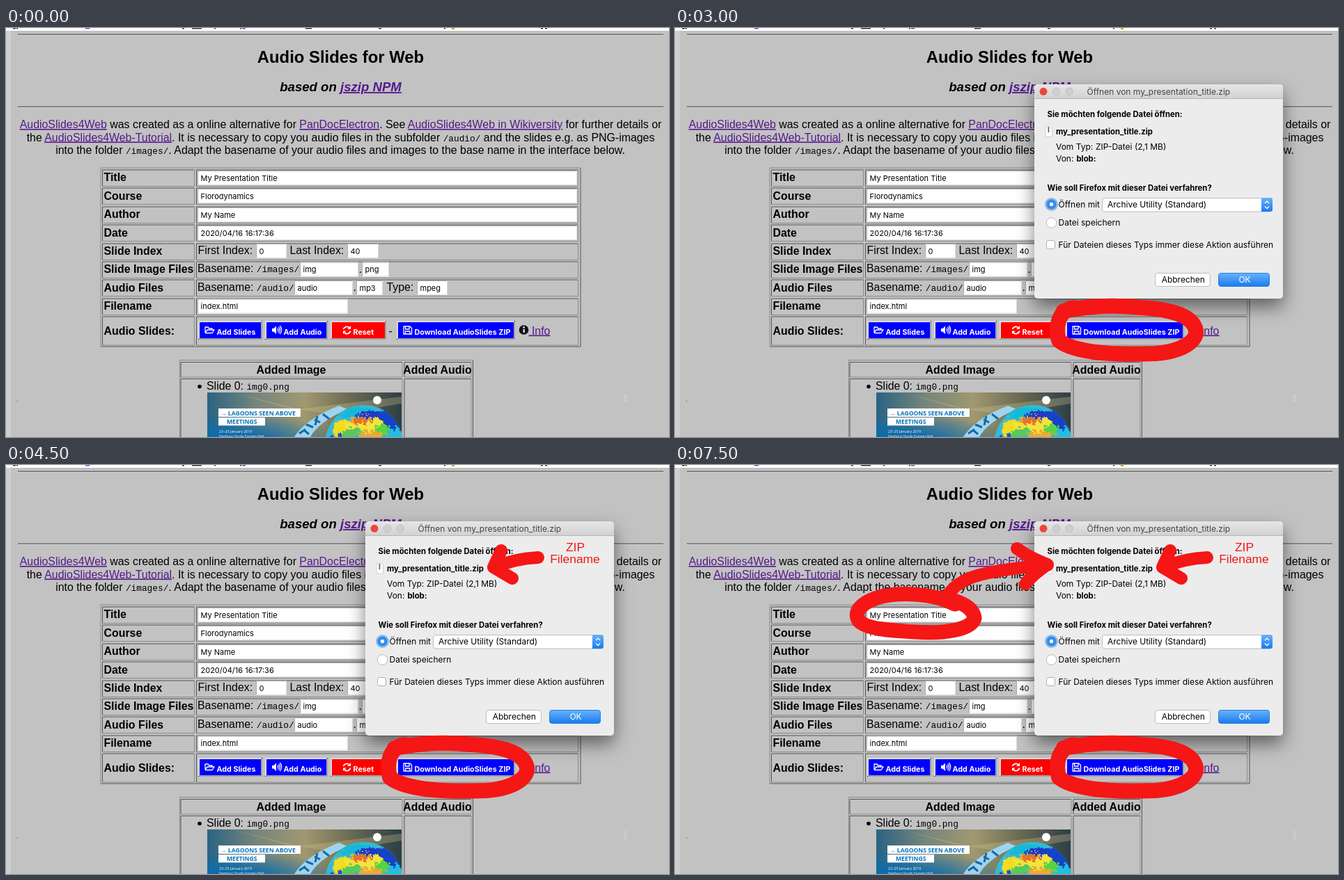
Write an HTML page that moves like this. It is 952 px wide and 588 px high and loops after 8 s.

```html
<!DOCTYPE html>
<html lang="en">
<head>
<meta charset="utf-8">
<title>Audio Slides for Web</title>
<style>
html, body { margin: 0; width: 100%; height: 100%; overflow: hidden; background: #c2c2c2; }
svg { display: block; width: 952px; height: 588px; }
text { font: 15.9px "Liberation Sans", Arial, sans-serif; white-space: pre; }
.b { font-weight: 700; }
.mid { text-anchor: middle; }
.link { fill: #551a8b; text-decoration: underline; }
.code { font: 12.8px "Liberation Mono", "Courier New", monospace; }
.h2 { font-size: 23.85px; font-weight: 700; }
.h3 { font-size: 18.6px; font-weight: 700; font-style: italic; }
.field { font: 11px Inter, sans-serif; }
.btn { font: 700 10.75px Inter, sans-serif; fill: #fff; }
.ui { font: 12px Inter, sans-serif; }
.uib { font: 700 11.3px Inter, sans-serif; }
.tag { font: 700 8.6px "Open Sans", sans-serif; fill: #0873b8; }
.tiny { font: 5.2px "Open Sans", sans-serif; fill: #fff; }
.note { font-size: 17.4px; fill: #f51616; }
.pen { fill: none; stroke: #f51616; stroke-linecap: round; stroke-linejoin: round; }
.icon { fill: none; stroke: #fff; stroke-width: 1.3; stroke-linejoin: round; }
</style>
</head>
<body>
<svg id="stage" viewBox="0 0 952 588"></svg>
<script>
const DARK = '#555', MID = '#8a8a8a';

const rect = (x, y, w, h, fill, extra = '') =>
  `<rect x="${x}" y="${y}" width="${w}" height="${h}" fill="${fill}" ${extra}/>`;
const text = (x, y, s, cls = '', extra = '') =>
  `<text x="${x}" y="${y}" class="${cls}" ${extra}>${s}</text>`;
const circle = (x, y, r, fill, extra = '') =>
  `<circle cx="${x}" cy="${y}" r="${r}" fill="${fill}" ${extra}/>`;
const path = (d, extra = '') => `<path d="${d}" ${extra}/>`;
const pen = (d, width) => path(d, `class="pen" stroke-width="${width}"`);
const icon = d => path(d, 'class="icon"');
const link = s => `<tspan class="link">${s}</tspan>`;
const code = s => `<tspan class="code">${s}</tspan>`;
const group = (id, body) => `<g id="${id}">${body}</g>`;

// Box with separate colours for the top-left and bottom-right edges
function bevel(x, y, w, h, lit, shade, size = 1) {
  const c = size / 2, r = x + w - c, b = y + h - c;
  const edge = (d, color) => path(d, `fill="none" stroke="${color}" stroke-width="${size}"`);
  return edge(`M${x + c} ${b}V${y + c}H${r}`, lit) + edge(`M${x + c} ${b}H${r}V${y + c}`, shade);
}
const cell = (x, y, w, h) => bevel(x, y, w, h, DARK, MID);
const field = (x, y, w, s, h = 21) =>
  rect(x, y, w, h, '#fff') + bevel(x, y, w, h, '#aaa', '#ddd') + text(x + 4.5, y + 14.5, s, 'field');
const button = (x, w, color, labelX, label) =>
  rect(x, 421, w, 27, color) + bevel(x, 421, w, 27, '#dcdcdc', '#a0a0a0', 2) + text(labelX, 440.5, label, 'btn');
const rule = y => rect(17, y, 927, 1.6, '#707070') + rect(17, y + 1.6, 927, 1, '#d8d8d8');

function topStrip() {
  const bits = [[10, 4], [15, 2], [253, 3], [267, 14], [299, 2], [336, 2], [430, 9], [535, 4], [629, 2], [768, 3], [774, 3]];
  return rect(0, 0, 952, 4, '#fff') +
    bits.map(([x, w]) => rect(x, 0, w, 1.4, '#333')).join('') +
    rect(114, 0, 6, 1.4, '#6a4cc0') + rect(339, 0, 5, 1.4, '#6a4cc0') + rect(640, 0, 4, 2, '#e09a30');
}

function heading() {
  return rule(8.5) + text(480.5, 50, 'Audio Slides for Web', 'h2 mid') +
    text(480.5, 91, 'based on ' + link('jszip NPM'), 'h3 mid') + rule(112.5) +
    text(480.5, 144, `${link('AudioSlides4Web')} was created as a online alternative for ${link('PanDocElectron')}. See ${link('AudioSlides4Web in Wikiversity')} for further details or`, 'mid') +
    text(480.5, 162.5, `the ${link('AudioSlides4Web-Tutorial')}. It is necessary to copy you audio files in the subfolder ${code('/audio/')} and the slides e.g. as PNG-images`, 'mid') +
    text(480, 181, `into the folder ${code('/images/')}. Adapt the basename of your audio files and images to the base name in the interface below.`, 'mid');
}

function form() {
  const labels = ['Title', 'Course', 'Author', 'Date', 'Slide Index', 'Slide Image Files', 'Audio Files', 'Filename', 'Audio Slides:'];
  const values = ['My Presentation Title', 'Florodynamics', 'My Name', '2020/04/16 16:17:36'];
  const rowY = i => 203 + 26.4 * i;
  let s = bevel(135.5, 200.5, 690, 258, MID, DARK);
  labels.forEach((label, i) => {
    const y = Math.round(rowY(i)) + .5, h = i < 8 ? 24.5 : 42;
    s += cell(138, y, 133, h) + cell(273, y, 549, h) +
      text(140.5, i < 8 ? rowY(i) + 17.3 : 440.5, label, 'b');
  });
  values.forEach((v, i) => s += field(275, Math.round(rowY(i) + 2), 545, v));
  s += text(275.5, 325, 'First Index:') + field(359, 310, 44, '0') +
    text(407.5, 325, 'Last Index:') + field(490, 310, 45, '40');
  s += text(275, 351, 'Basename: ' + code('/images/')) + field(422, 336.5, 84, 'img') +
    text(506.5, 352, '.') + field(511, 336.5, 39, 'png');
  s += text(275, 378, 'Basename: ' + code('/audio/')) + field(414, 363, 84, 'audio') +
    text(498.5, 378, '.') + field(503, 363, 38, 'mp3') + text(546.5, 378, 'Type:') + field(590, 363, 44, 'mpeg');
  return s + field(275, 389.5, 216, 'index.html');
}

function buttons() {
  const blue = '#0000ff';
  return button(276, 92, blue, 302.5, 'Add Slides') +
    icon('M286 438V430H290L291.500 432H296V434M286 438L289 434H299L296 438.500H286') +
    button(372, 90, blue, 398.5, 'Add Audio') +
    path('M382 432H384.500L388 428.500V440L384.500 436.500H382Z', 'fill="#fff"') +
    icon('M390 432Q391.500 434 390 436.500M391.500 430Q395 434 391.500 438.500M393.300 428Q398 434 393.300 440') +
    button(466, 80, '#ff0000', 498.5, 'Reset') +
    path('M484.500 433A5 5 0 0 1 493 431M494.500 435.500A5 5 0 0 1 486 438', 'class="icon" style="stroke-width:1.8"') +
    path('M495 428V433H490ZM484 440V435.500H488.500Z', 'fill="#fff"') +
    text(549.5, 440.5, '-') +
    button(561, 170, blue, 586.5, 'Download AudioSlides ZIP') +
    icon('M571 429H580L582.500 431.500V440H571ZM573.500 429V433H579V429M573.500 440V436H580V440') +
    circle(743.5, 434, 6.8, '#111') + rect(742.5, 433, 2.4, 5, '#ddd') + circle(743.6, 430.5, 1.4, '#ddd') +
    text(750.5, 440.5, link(' Info'));
}

function globe() {
  const blobs = [
    [500, 548, 30, 8, '#18b8d8'], [545, 560, 24, 17, '#1542c8'], [478, 571, 15, 14, '#f2dc20'],
    [512, 566, 27, 13, '#f4e33c'], [505, 560, 14, 5, '#e8702b'], [521, 551, 11, 6, '#2038c8'],
    [536, 573, 12, 8, '#54d444'], [493, 580, 18, 8, '#58c860'], [520, 583, 20, 7, '#f0a838'],
    [553, 582, 12, 10, '#20bee0'], [475, 587, 15, 6, '#2350cc'], [506, 551, 8, 3, '#243bc4']
  ];
  return circle(514, 598, 56, '#35b9d4') + `<g clip-path="url(#globe)" filter="url(#rough)">` +
    blobs.map(([x, y, rx, ry, c]) => `<ellipse cx="${x}" cy="${y}" rx="${rx}" ry="${ry}" fill="${c}"/>`).join('') + '</g>';
}

function poster() {
  return `<g clip-path="url(#poster)">` + rect(289, 524, 279, 64, 'url(#sky)') +
    rect(289, 524, 279, 64, 'url(#sea)') +
    path('M325 524L420 548L568 530V540L470 556L400 545Z', 'fill="#d7c58a" opacity=".3"') +
    path('M414 588Q430 562 478 543L490 548Q448 567 437 588Z', 'fill="#9ed4ef"') +
    path('M421 583L430 577M431 570L441 574M443 563L451 567M455 555L464 562M428 578L435 584M447 558L444 571', 'stroke="#1768a8" stroke-width="3"') +
    globe() + circle(533, 535, 6, '#fff') +
    rect(305, 547, 118, 12, '#fff') + text(308, 556.5, '→ LAGOONS SEEN ABOVE', 'tag') +
    rect(305, 560, 67, 11.5, '#fff') + text(317, 569.1, 'MEETINGS', 'tag') +
    text(306, 582, '23–25 January 2019', 'tiny') + text(306, 589, 'Harbour Study Society Hall', 'tiny') + '</g>';
}

function slideTable() {
  return bevel(249, 477, 422, 140, MID, DARK) + cell(250.5, 480, 319, 22.5) + cell(571.5, 480, 97, 22.5) +
    cell(250.5, 504, 319, 110) + cell(571.5, 504, 97, 110) +
    text(409.5, 497, 'Added Image', 'b mid') + text(619.5, 497, 'Added Audio', 'b mid') +
    circle(278, 515.5, 2.8, '#000') + text(288, 520, 'Slide 0: ' + code('img0.png')) + poster();
}

function dialog() {
  const radio = (y, fill) => circle(540.5, y, 7.3, fill, 'stroke="#aaa" stroke-width=".8"');
  return rect(516, 81, 357, 308, '#ececec', 'rx="5" filter="url(#shadow)"') +
    path('M516 101V86Q516 81 521 81H868Q873 81 873 86V101Z', 'fill="url(#bar)"') + rect(516, 101, 357, 1, '#b5b5b5') +
    circle(529, 91.3, 5.5, '#f0443c') + [547.7, 566.3].map(x => circle(x, 91.3, 5.3, '#cfcfcf', 'stroke="#b8b8b8" stroke-width=".8"')).join('') +
    text(591.5, 95.7, 'Öffnen von my_presentation_title.zip', 'ui', 'fill="#444"') +
    text(534.5, 127.5, 'Sie möchten folgende Datei öffnen:', 'uib') +
    path('M532 141H538L541.500 144.500V156H532Z', 'fill="#fff" stroke="#bbb" stroke-width=".6"') + rect(535.5, 142, 1.8, 8, '#666') +
    text(547, 152.5, 'my_presentation_title.zip', 'uib') +
    text(547, 174.7, 'Vom Typ:', 'ui') + text(604, 174.7, 'ZIP-Datei (2,1 MB)', 'ui') +
    text(547, 192.3, 'Von:', 'ui') + text(576.5, 192.3, 'blob:', 'uib') +
    text(534.5, 233.7, 'Wie soll Firefox mit dieser Datei verfahren?', 'uib') +
    circle(540.5, 253.5, 9.5, '#8dbdf0') + radio(253.5, '#2f8cf5') + circle(540.5, 253.5, 2.7, '#fff') +
    text(550.5, 258, 'Öffnen mit', 'ui') +
    rect(613.5, 244.5, 244, 19.5, '#fff', 'rx="3.500" stroke="#bdbdbd"') +
    path('M842 244H854.500Q858 244 858 247.500V260.500Q858 264 854.500 264H842Z', 'fill="url(#blue)"') +
    path('M847 252L850 249L853 252M847 256.500L850 259.500L853 256.500', 'class="icon"') +
    text(621, 258, 'Archive Utility (Standard)', 'ui') +
    radio(280, '#fff') + text(550.5, 284.2, 'Datei speichern', 'ui') +
    rect(533.5, 305.5, 12, 12, '#fff', 'rx="2.500" stroke="#b0b0b0"') +
    text(550.5, 316, 'Für Dateien dieses Typs immer diese Aktion ausführen', 'ui') +
    rect(689.5, 352.5, 79, 19, '#fff', 'rx="3.500" stroke="#bdbdbd"') + text(729.8, 366.3, 'Abbrechen', 'ui mid') +
    rect(780.5, 352.5, 73, 19, 'url(#blue)', 'rx="3.500" stroke="#2a7fe0"') + text(818, 366.3, 'OK', 'ui mid', 'fill="#fff"');
}

const defs = `<defs>
<linearGradient id="sky"><stop stop-color="#2a6382"/><stop offset=".25" stop-color="#75857c"/><stop offset=".5" stop-color="#a1986f"/><stop offset=".75" stop-color="#676852"/><stop offset="1" stop-color="#2c3e46"/></linearGradient>
<radialGradient id="sea" cx=".1" cy="1.1" r=".62"><stop offset=".3" stop-color="#0d6cab" stop-opacity=".95"/><stop offset="1" stop-color="#0d6cab" stop-opacity="0"/></radialGradient>
<linearGradient id="bar" x2="0" y2="1"><stop stop-color="#e6e6e6"/><stop offset="1" stop-color="#d2d2d2"/></linearGradient>
<linearGradient id="blue" x2="0" y2="1"><stop stop-color="#66b3f8"/><stop offset="1" stop-color="#1a7af2"/></linearGradient>
<clipPath id="poster"><rect x="289" y="524" width="279" height="64"/></clipPath>
<clipPath id="globe"><circle cx="514" cy="598" r="56"/></clipPath>
<filter id="rough"><feTurbulence baseFrequency=".12" numOctaves="2" seed="4"/><feDisplacementMap in="SourceGraphic" scale="18" xChannelSelector="R" yChannelSelector="G"/></filter>
<filter id="shadow" x="-20%" y="-20%" width="140%" height="150%"><feDropShadow dx="0" dy="12" stdDeviation="13" flood-opacity=".5"/></filter>
</defs>`;

const stage = document.getElementById('stage');
stage.innerHTML = defs + rect(0, 0, 952, 588, '#c2c2c2') + rect(0, 4, 7, 584, '#cfcfcf') + topStrip() +
  heading() + form() + buttons() + slideTable() +
  circle(16.5, 536.5, 1, '#888') + rect(887, 526, 5, 12, '#cacaca') +
  group('wideRing', pen('M592 404C566 403 548 416 545 438C543 456 556 463 585 466C640 474 700 476 735 469C758 463 768 452 765 440C760 423 740 413 715 408C680 401 640 398 588 403', 22)) +
  group('dialog', dialog() + pen('M572 402C550 406 546 430 551 449C570 465 620 471 690 468C730 465 750 449 748 435C744 414 715 405 670 402C630 398 600 399 558 407', 22)) +
  group('zipNote', pen('M764 133C740 134 720 139 700 147M711 123L700 147L727 163', 18) +
    text(817.5, 124, 'ZIP', 'note mid') + text(817, 141, 'Filename', 'note mid')) +
  group('titleRing', pen('M402 200C370 184 320 182 290 191C266 199 256 212 264 224C275 236 310 238 345 240C385 243 426 237 430 220C428 203 405 194 382 191', 21)) +
  group('titleArrow', pen('M388 196C395 173 420 161 450 155C480 149 510 146 535 144M491 120C504 130 520 137 535 143C523 151 511 161 503 171', 18));

const LOOP = 8000;
const shown = { wideRing: [1500, 3000], dialog: [3000, LOOP], zipNote: [4500, LOOP], titleRing: [6000, LOOP], titleArrow: [7500, LOOP] };
const layers = Object.entries(shown).map(([id, span]) => [document.getElementById(id), ...span]);

function render(time) {
  const t = time % LOOP;
  for (const [el, from, to] of layers) el.style.display = t >= from && t < to ? '' : 'none';
}

const start = performance.now();
function tick() {
  render(performance.now() - start);
  requestAnimationFrame(tick);
}
tick();
</script>
</body>
</html>
```
